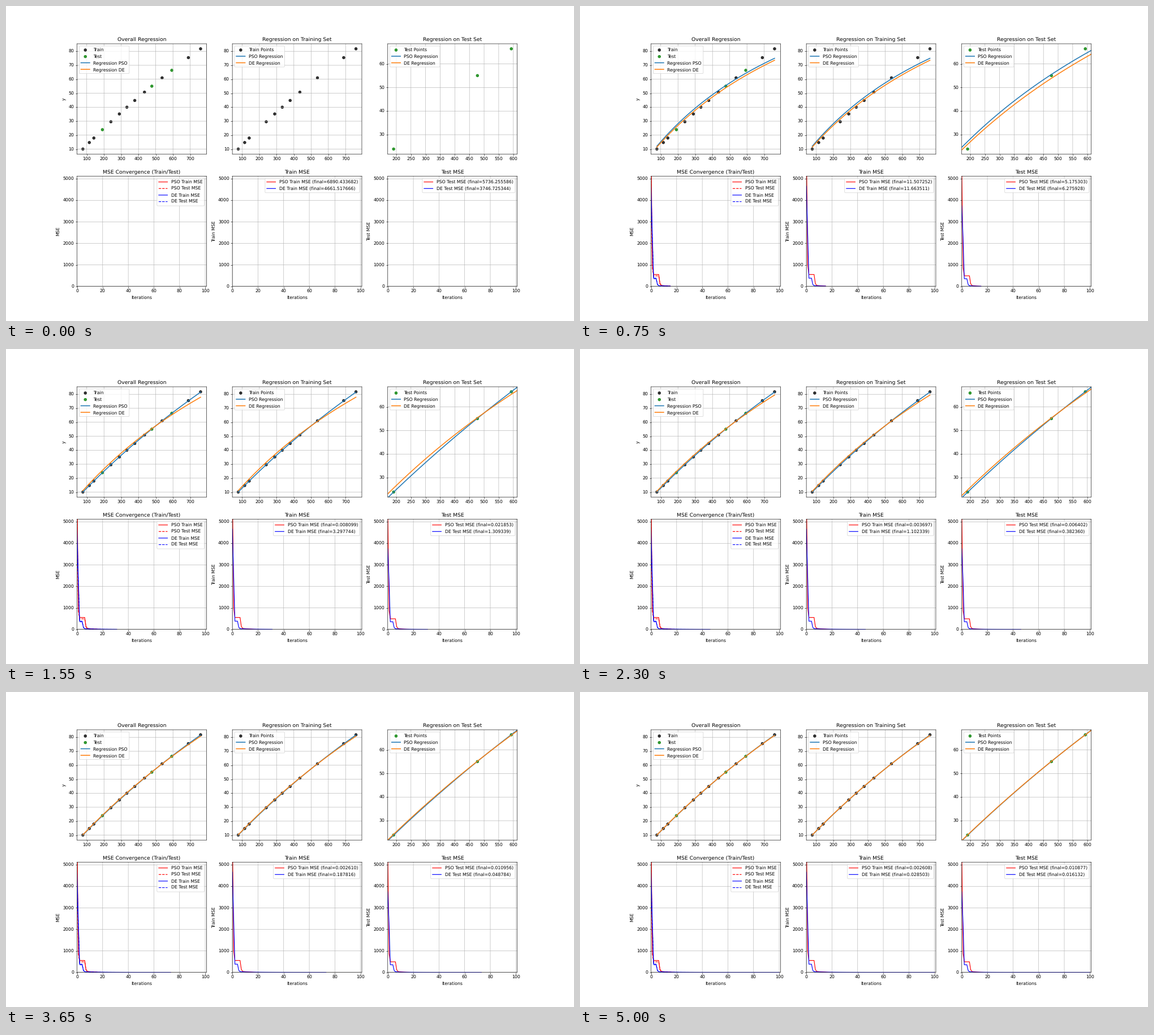
Animation, 1004 px wide and 558 px high, one loop 5.05 s. Source, as a matplotlib script:

```python
import numpy as np
import matplotlib.pyplot as plt
from matplotlib.animation import FuncAnimation

# Unsnapped lines and unhinted text keep sub-pixel positions at this low dpi
plt.rcParams.update({"font.family": "DejaVu Sans", "text.hinting": "none",
                     "path.snap": False})

DPI = 55.8
STEPS = 101
INTERVAL = 50

# Misra data set: load and stored energy
x = np.array([77.6, 114.9, 141.1, 190.8, 239.9, 289.0, 332.8,
              378.4, 434.8, 477.3, 536.8, 593.1, 689.1, 760.0])
y = np.array([10.07, 14.73, 17.94, 23.93, 29.61, 35.18, 40.02,
              44.82, 50.76, 55.05, 61.01, 66.40, 75.47, 81.78])
is_test = np.isin(x, [190.8, 477.3, 593.1])
x_fit = np.linspace(x.min(), x.max(), 200)
iters = np.arange(STEPS)

# Every fitted curve is defined by its height at two loads
ANCHORS = np.array([190.8, 593.1])
BEST = np.array([23.83, 66.51])
BEND = np.array([0.975, -0.65])      # shift per unit of root train MSE
DE_LAG = np.array([1.23, 1.58])      # extra sag of DE before it settles

MILESTONES = [0, 15, 31, 46, 58, 73, 100]


def history(errors, level, first, hold):
    """Plunge to a plateau, hold it, then decay log-linearly."""
    start, *rest = errors
    t = [0, 1, 2, hold, hold + 1, hold + 2, *MILESTONES[1:]]
    e = [start, first * level, level, level, level / 4, level / 12, *rest]
    return np.exp(np.interp(iters, t, np.log(e)))


mse = {
    ("PSO", "Train"): history([6890.433682, 11.507252, 0.008099, 0.003697,
                               0.002719, 0.002610, 0.002608], 553, 1.8, 6),
    ("PSO", "Test"): history([5736.255586, 5.175303, 0.021853, 0.006402,
                              0.012776, 0.010956, 0.010877], 490, 1.8, 6),
    ("DE", "Train"): history([4661.517666, 11.663511, 3.297744, 1.102339,
                              0.351493, 0.187816, 0.028503], 380, 6.5, 4),
    ("DE", "Test"): history([3746.725344, 6.275928, 1.309339, 0.382360,
                             0.099661, 0.048784, 0.016132], 355, 6.5, 4),
}
methods = ["PSO", "DE"]
colors = {"PSO": "red", "DE": "blue"}


def curve(method, i):
    """Flat while worse than the mean, then bending towards the best fit."""
    error = mse[method, "Train"][i]
    spread = y[~is_test].var()
    if error > spread:
        return np.full_like(x_fit, y[~is_test].mean() + np.sqrt(error - spread))
    heights = BEST + BEND * np.sqrt(error)
    if method == "DE":
        heights = heights - DE_LAG * np.clip((31 - i) / 16, 0, 1)
    # b1*b2*x / (1 + b2*x): the ratio x/y is linear in x
    ratio = ANCHORS / heights
    slope = np.diff(ratio) / np.diff(ANCHORS)
    return x_fit / (ratio[0] + slope * (x_fit - ANCHORS[0]))


fig, axes = plt.subplots(
    2, 3, figsize=(1004.001 / DPI, 558.001 / DPI), dpi=DPI)
ax_all, ax_train, ax_test = axes[0]
ax_conv, ax_mse_train, ax_mse_test = axes[1]
fit_lines, mse_lines = [], []


def dots(ax, mask, color, label):
    ax.scatter(x[mask], y[mask], color=[color] * mask.sum(), alpha=0.8,
               label=label)


def fit_panel(ax, title, label):
    xlim, ylim = ax.get_xlim(), ax.get_ylim()
    for method in methods:
        line, = ax.plot([], [], lw=2, label=label.format(method))
        fit_lines.append((line, method))
    ax.set(title=title, xlim=xlim, ylim=ylim)
    ax.grid(True)
    ax.legend(loc="upper left")


def mse_panel(ax, title, ylabel, kinds):
    for method in methods:
        for kind, style in zip(kinds, ("-", "--")):
            line, = ax.plot([], [], color=colors[method], ls=style,
                            label=f"{method} {kind} MSE")
            mse_lines.append((line, mse[method, kind]))
    ax.set(title=title, xlabel="Iterations", ylabel=ylabel,
           xlim=(0, STEPS), ylim=(0, 1.1 * mse["DE", "Train"][0]))
    ax.grid(True)
    return ax.legend(loc="upper right")


dots(ax_all, ~is_test, "black", "Train")
dots(ax_all, is_test, "green", "Test")
dots(ax_train, ~is_test, "black", "Train Points")
dots(ax_test, is_test, "green", "Test Points")
ax_all.set_ylabel("y")
fit_panel(ax_all, "Overall Regression", "Regression {}")
fit_panel(ax_train, "Regression on Training Set", "{} Regression")
fit_panel(ax_test, "Regression on Test Set", "{} Regression")

mse_panel(ax_conv, "MSE Convergence (Train/Test)", "MSE", ["Train", "Test"])
legends = {kind: mse_panel(ax, f"{kind} MSE", f"{kind} MSE", [kind])
           for kind, ax in (("Train", ax_mse_train), ("Test", ax_mse_test))}


def update(i):
    curves = {method: curve(method, i) for method in methods}
    for line, method in fit_lines:
        line.set_data(x_fit, curves[method])
    for line, errors in mse_lines:
        line.set_data(iters[:i + 1], errors[:i + 1])
    for kind, legend in legends.items():
        for text, method in zip(legend.get_texts(), methods):
            final = mse[method, kind][i]
            text.set_text(f"{method} {kind} MSE (final={final:.6f})")
    return []


anim = FuncAnimation(fig, update, frames=STEPS, interval=INTERVAL,
                     repeat=True, repeat_delay=0, blit=False)
plt.show()
```
